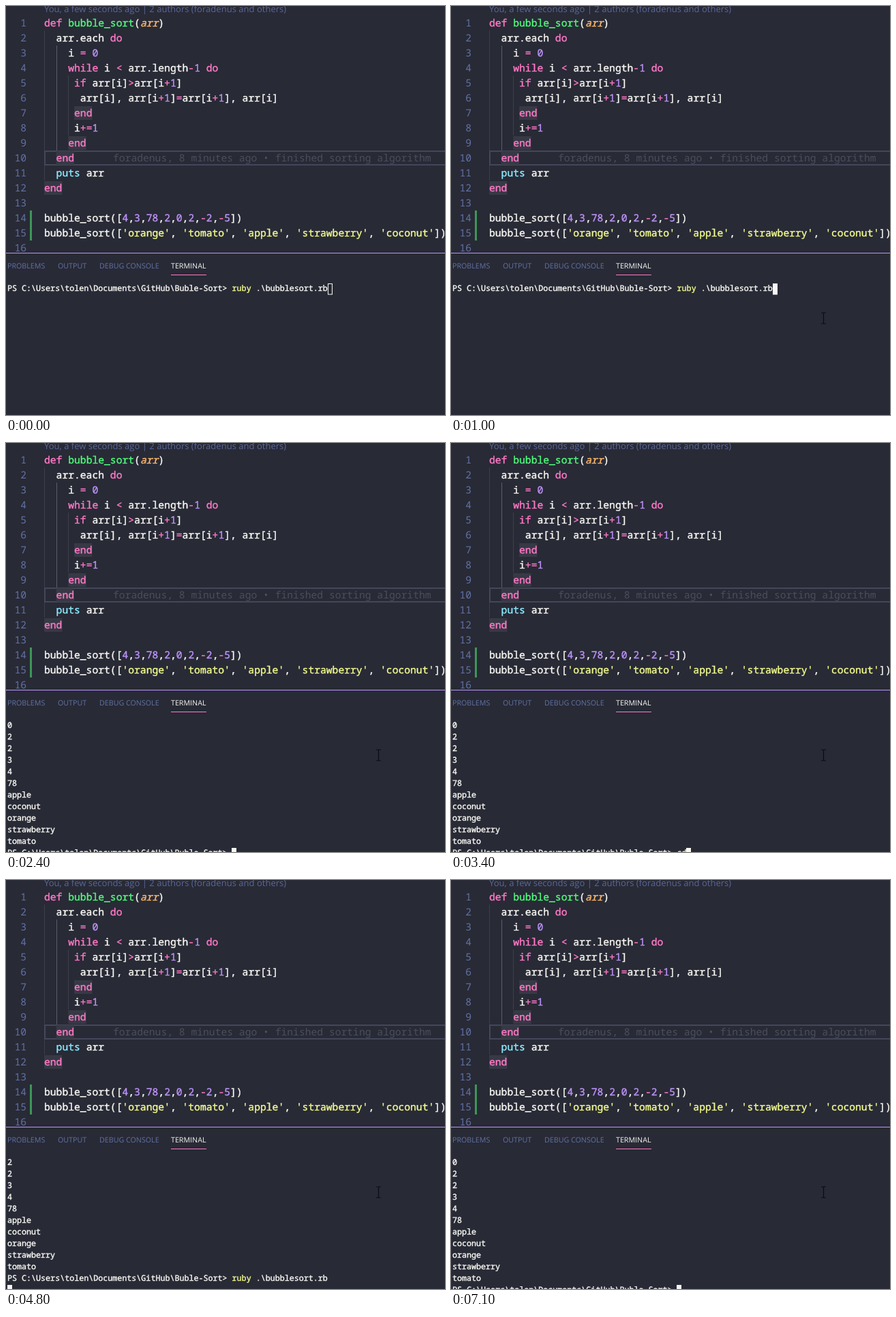
These frames come from a looping animation (644 px wide and 600 px high, 7200 ms). An HTML page:

```html
<!DOCTYPE html>
<html lang="en">
<head>
<meta charset="utf-8">
<title>Bubble sort in the terminal</title>
<style>
  html, body { margin: 0; width: 100%; height: 100%; overflow: hidden; background: #282a36; }
  svg { display: block; width: 644px; height: 600px; color: #f8f8f2; }
  text, tspan { fill: currentColor; }
  text { white-space: pre; text-rendering: geometricPrecision; }
  .code { font: 14.68px "Noto Sans Mono", monospace; }
  .term { font: 11.7px "Noto Sans Mono", monospace; }
  .code tspan, .term text, .term tspan { stroke: currentColor; stroke-width: .4px; }
  .ui { font: 10.7px "Open Sans", sans-serif; }
  .lens { font: 13.05px "Open Sans", sans-serif; }
  .muted { color: #6272a4; }
  .lens.muted { color: #5b6796; }
  .blame { color: #4b4e5c; }
  .string, .cmd { color: #f1fa8c; }
  .keyword, .operator { color: #ff79c6; }
  .name { color: #50fa7b; }
  .param { color: #ffb86c; font-style: italic; }
  .builtin { color: #8be9fd; }
  .number { color: #bd93f9; }
  .match { fill: #373945; }
  .guide { fill: #3d3f4c; }
  .guide.active { fill: #5b5d69; }
</style>
</head>
<body>
<svg id="stage" viewBox="0 0 644 600">
  <text class="lens muted" x="56" y="9.3">You, a few seconds ago | 2 authors (foradenus and others)</text>
  <g shape-rendering="crispEdges">
    <rect class="guide" x="56" y="36" width="1" height="220"/>
    <rect class="guide active" x="74" y="58" width="1" height="154"/>
    <rect class="guide" x="91" y="102" width="1" height="88"/>
    <rect x="57" y="213" width="600" height="20" fill="none" stroke="#44475a" stroke-width="2"/>
    <rect x="35" y="300" width="3" height="44" fill="#3f9657"/>
  </g>
  <g id="editor" class="code"></g>
  <text class="code blame" x="157" y="228">foradenus, 8 minutes ago • finished sorting algorithm</text>
  <rect y="362" width="644" height="238" fill="#282a36"/>
  <rect y="362" width="644" height="1" fill="#bd93f9"/>
  <g class="ui">
    <text class="muted" x="2" y="385">PROBLEMS</text>
    <text class="muted" x="76" y="385">OUTPUT</text>
    <text class="muted" x="137" y="385">DEBUG CONSOLE</text>
    <text x="242" y="385">TERMINAL</text>
  </g>
  <rect x="242" y="394" width="52" height="1" fill="#ff79c6"/>
  <g id="terminal" class="term"></g>
  <rect id="caret" stroke="#f8f8f2"/>
  <path id="pointer" d="M-3.5-8H-1L0-7L1-8H3.5M0-7V7M-3.5 8H-1L0 7L1 8H3.5" fill="none" stroke="#0c0d12" stroke-width="1.2"/>
</svg>
<script>
const $ = id => document.getElementById(id);

function add(parent, tag, attrs, text = '') {
  const el = document.createElementNS('http://www.w3.org/2000/svg', tag);
  for (const key in attrs) el.setAttribute(key, attrs[key]);
  el.textContent = text;
  return parent.appendChild(el);
}

// Editor
const source = `def bubble_sort(arr)
  arr.each do
    i = 0
    while i < arr.length-1 do
     if arr[i]>arr[i+1]
      arr[i], arr[i+1]=arr[i+1], arr[i]
     end
     i+=1
    end
  end
  puts arr
end

bubble_sort([4,3,78,2,0,2,-2,-5])
bubble_sort(['orange', 'tomato', 'apple', 'strawberry', 'coconut'])
`;
const token = /(?<string>'[^']*')|(?<keyword>\b(?:def|do|while|if|end)\b)|(?<name>(?<=def )\w+)|(?<param>(?<=def \w+\()\w+)|(?<builtin>\bputs\b)|(?<number>\d+)|(?<operator>[-+<>=]+)/g;

function highlight(el, code) {
  let pos = 0;
  for (const m of code.matchAll(token)) {
    add(el, 'tspan', {}, code.slice(pos, m.index));
    add(el, 'tspan', { class: Object.keys(m.groups).find(k => m.groups[k]) }, m[0]);
    pos = m.index + m[0].length;
  }
  add(el, 'tspan', {}, code.slice(pos));
}

source.split('\n').forEach((line, i) => {
  const y = 30 + 22 * i;
  const code = line.trimStart();
  const x = 56 + 8.808 * (line.length - code.length);
  add($('editor'), 'text', { class: 'muted', x: 30, y, 'text-anchor': 'end' }, i + 1);
  if (code === 'end') add($('editor'), 'rect', { class: 'match', x, y: y - 15, width: 26.4, height: 20 });
  highlight(add($('editor'), 'text', { x, y }), code);
});

// Terminal
const LOOP = 7200, ROWS = 12, CELL = 7.02, ROW = 17;
const prompt = 'PS C:\\Users\\tolen\\Documents\\GitHub\\Buble-Sort> ';
const run = 'ruby .\\bubblesort.rb';
const output = '-5 -2 0 2 2 3 4 78 apple coconut orange strawberry tomato'.split(' ');
const OFF = 0, ON = 1, HOLLOW = 2;

// time, output shown, typed text, entered, caret
const steps = [
  [0, false, run, false, HOLLOW],
  [800, false, run, false, ON],
  [1300, false, run, true, ON],
  [1700, true, '', false, ON],
  [2000, true, '', false, OFF],
  [2400, true, '', false, ON],
  [2800, true, '', false, OFF],
  [3100, true, '', false, ON],
  [3300, true, 'c', false, ON],
  [3400, true, 'cd', false, ON],
  [3700, true, 'c', false, ON],
  [3800, true, '', false, ON],
  [4100, true, run, false, ON],
  [4500, true, run, false, OFF],
  [4800, true, run, true, ON],
  [5200, true, '', false, ON],
  [6200, true, '', false, OFF],
  [6500, true, '', false, ON],
  [6900, true, '', false, OFF],
  [7100, true, '', false, ON]
];

function showTerminal([, printed, typed, entered, caret]) {
  const lines = [...(printed ? output : []), prompt + typed, ...(entered ? [''] : [])].slice(-ROWS);
  $('terminal').replaceChildren();
  lines.forEach((line, i) => {
    const el = add($('terminal'), 'text', { x: 2, y: 418.4 + ROW * i });
    if (!line.startsWith(prompt)) return void (el.textContent = line);
    const [cmd] = typed.split(' ');
    add(el, 'tspan', {}, prompt);
    add(el, 'tspan', { class: 'cmd' }, cmd);
    add(el, 'tspan', {}, typed.slice(cmd.length));
  });
  const box = {
    x: Math.floor(2 + CELL * lines.at(-1).length) + 0.5,
    y: 407.5 + ROW * (lines.length - 1),
    width: 6, height: 15.5,
    fill: caret === ON ? '#f8f8f2' : 'none',
    visibility: caret === OFF ? 'hidden' : 'visible'
  };
  for (const key in box) $('caret').setAttribute(key, box[key]);
}

// The pointer glides in from the lower right, at ten positions a second
function showPointer(t) {
  const p = Math.min(1, Math.max(0, (Math.floor(t / 100) * 100 - 100) / 600));
  const left = (1 - p) ** 3;
  $('pointer').setAttribute('transform', `translate(${546.5 + 94 * left} ${458 + 90 * left})`);
  $('pointer').setAttribute('visibility', t < 100 ? 'hidden' : 'visible');
}

let current;
const start = performance.now();
function draw(now) {
  const t = Math.max(0, now - start) % LOOP;
  const step = steps.findLast(s => s[0] <= t);
  if (step !== current) showTerminal(current = step);
  showPointer(t);
  requestAnimationFrame(draw);
}
draw(start);
</script>
</body>
</html>
```
